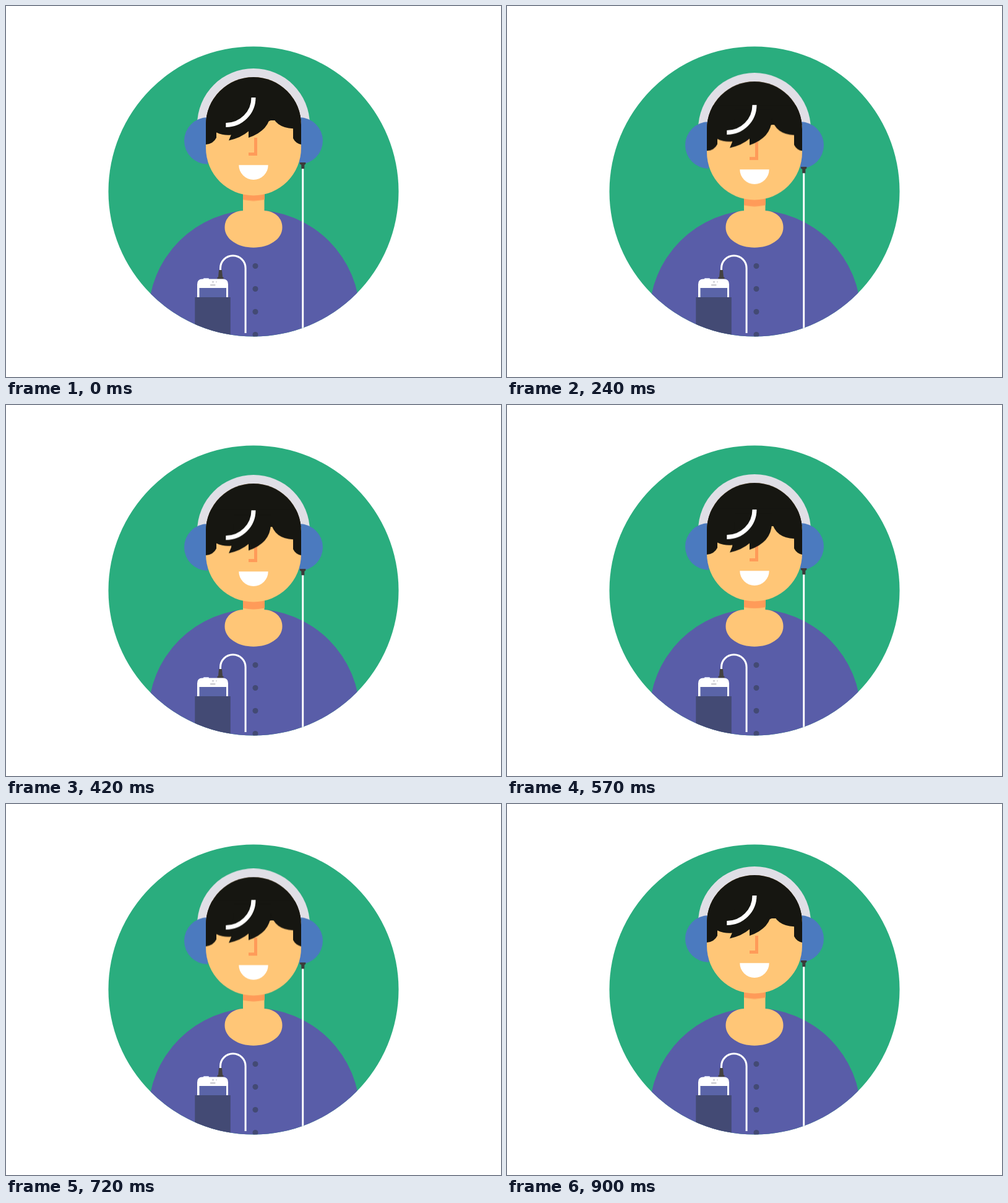
Animation, 800 px wide and 600 px high, one loop 0.93 s. Source, as an HTML page:

```html
<!DOCTYPE html>
<html lang="en">
<head>
<meta charset="utf-8">
<title>Listening to music</title>
<style>
  html, body { margin: 0; width: 100%; height: 100%; overflow: hidden; background: #fff; }
  svg { display: block; width: 800px; height: 600px; }

  .nod, .swing { animation: nod 930ms infinite cubic-bezier(.6, 0, .4, 1); }
  .swing { animation-name: swing; }
  .head { --drop: 12.1px; }
  .shade { --drop: 15.5px; }
  .sides { --drop: 7.3px; }
  .lock { --drop: 10.5px; }

  @keyframes nod {
    0%, 96.774%, 100% { transform: translateY(0); }
    48.387% { transform: translateY(var(--drop)); }
  }
  /* the hair settles a little after the head */
  @keyframes swing {
    0%, 96.774%, 100% { transform: translateY(0); }
    53.226% { transform: translateY(var(--drop)); }
  }
</style>
</head>
<body>
<svg viewBox="0 0 800 600">
  <defs>
    <path id="skull" d="M323 192a77 77 0 0 1 154 0v37.5a77 77 0 0 1-154 0z"/>
    <clipPath id="badge"><circle cx="400" cy="300" r="234.5"/></clipPath>
    <clipPath id="scalp"><use href="#skull"/></clipPath>
    <clipPath id="throat"><path d="M383 280h34.5v51.5H383z"/></clipPath>
  </defs>

  <circle cx="400" cy="300" r="234.5" fill="#2aad7e"/>
  <g clip-path="url(#badge)">
    <circle cx="401" cy="501" r="171" fill="#595da8"/>

    <g fill="#ffc677">
      <path d="M383 285h34.5v50H383z"/>
      <path d="M383 331C365 332 353.5 343 353.5 358C353.5 378 376 390.7 400 390.7S446.5 378 446.5 358C446.5 343 435 332 417.5 331z"/>
    </g>
    <g clip-path="url(#throat)">
      <use class="nod shade" href="#skull" y="8.5" fill="#ff9b59"/>
    </g>

    <g fill="#434a74">
      <circle cx="403" cy="420.5" r="4.5"/>
      <circle cx="403" cy="457.5" r="4.5"/>
      <circle cx="403" cy="494.5" r="4.5"/>
      <circle cx="403" cy="531.5" r="4.5"/>
    </g>

    <g class="phone">
      <path d="M346.5 430v-6a20.3 20.3 0 0 1 40.6 0v105" fill="none" stroke="#fff" stroke-width="3"/>
      <path d="M319 442v-1q0-1 1-1h7q1 0 1 1v1z" fill="#d5daf5"/>
      <path d="M344 427h5l1 11.5h1.5v3h-10v-3h1.500z" fill="#44413f"/>
      <path d="M309 472v-22q0-8.500 8.500-8.500h33q8.500 0 8.500 8.500v22z" fill="#fff"/>
      <path d="M312.500 456h43.500v16h-43.500z" fill="#5a64a8"/>
      <g fill="#d2d2d6">
        <circle cx="334.500" cy="446.200" r="1.600"/>
        <circle cx="340" cy="446.200" r="1"/>
        <rect x="330" y="449.700" width="8.500" height="3" rx="1"/>
      </g>
      <path d="M305.300 471h57.500v70h-57.500z" fill="#434a74"/>
    </g>

    <g class="nod head">
      <path d="M309 192a91 91 0 0 1 182 0z" fill="#e0dfe6"/>
      <path d="M326 180a38 38 0 0 0 0 76zM474 180a38 38 0 0 1 0 76z" fill="#4b7abf"/>
      <path d="M479.700 262v290" stroke="#fff" stroke-width="3"/>
      <path d="M475 253h9.300v2.500l-2 1.500v6.300h-5v-6.300l-2.300-1.500z" fill="#3c3a3a"/>

      <use href="#skull" fill="#ffc677"/>
      <path d="M403.500 213v26.500h-11.500" fill="none" stroke="#ff9b59" stroke-width="5"/>
      <path d="M376.300 257.300h47.400a23.700 23.700 0 0 1-47.400 0z" fill="#fff"/>

      <g clip-path="url(#scalp)" fill="#161611">
        <path d="M320 110h160v75H428L400 196H320z"/>
        <path class="swing sides" d="M320 150V224H323Q335 223 340 213V204.500Q352 210 364 208.500L395 200L428 171Q434 197 464 198.200V214Q468 222 477 224H480V150z"/>
        <g class="swing lock">
          <path d="M368 170L364 208L360 217.500Q380 213 392 202.500V213Q427 201 428 171V155H368z"/>
          <path d="M400 148A44.500 44.500 0 0 1 355.300 192.500" fill="none" stroke="#fff" stroke-width="7"/>
        </g>
      </g>
    </g>
  </g>
</svg>
</body>
</html>
```
